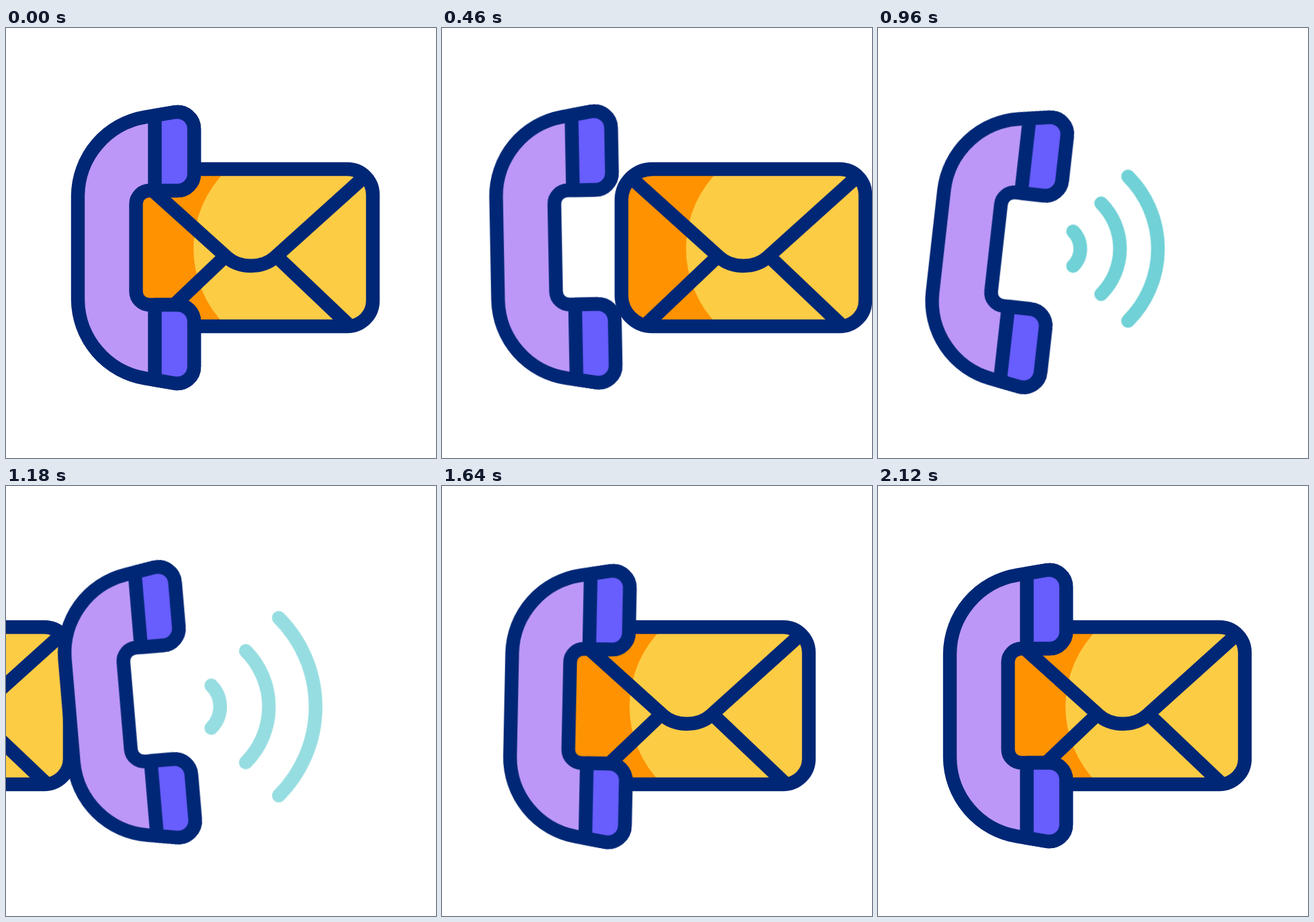
An HTML page without scripts for the animation above (2320 ms loop, 640 by 640 pixels).

```html
<!DOCTYPE html>
<html lang="en">
<head>
<meta charset="utf-8">
<title>Phone and mail</title>
<style>
  html, body { margin: 0; width: 100%; height: 100%; overflow: hidden; background: #fff; }
  svg { display: block; width: 100%; height: 100%; }

  .line { stroke: #002776; stroke-width: 20.4; stroke-linecap: round; stroke-linejoin: round; fill: none; }
  .shell { fill: #bc97f7; }
  .pad { fill: #685dfd; }

  .mail, .phone, .waves, .waves circle {
    animation: 2320ms linear infinite;
  }
  .mail { animation-name: pass; }
  .phone {
    transform-origin: 193.5px 327px;
    animation-name: recoil, ring;
  }
  .waves {
    fill: none; stroke: #70d1d6; stroke-width: 20.4; stroke-linecap: round;
    animation-name: drift, fade;
  }
  .waves circle {
    stroke-dasharray: 2 7;
    transform: rotate(-45deg);
    animation-name: grow;
  }
  .mail, .phone { animation-timing-function: cubic-bezier(.333, 0, .667, 1); }

  /* leaves on the right, returns from the left */
  @keyframes pass {
    0%, 12.931% { transform: translateX(0); }
    38.793% { transform: translateX(474px); animation-timing-function: step-end; }
    43.103% { transform: translateX(-577px); }
    68.966%, 100% { transform: translateX(0); }
  }
  @keyframes recoil {
    0%, 90.517%, 100% { translate: 0 0; }
    12.931% { translate: -25.6px 0; }
  }
  /* damped swing, one turn every 300 ms */
  @keyframes ring {
    0% { rotate: 0deg; }
    12.931% { rotate: 10deg; }
    25.862% { rotate: -10deg; }
    38.793% { rotate: 7.8deg; }
    51.724% { rotate: -5deg; }
    64.655% { rotate: 3.6deg; }
    77.586% { rotate: -1.7deg; }
    90.517%, 100% { rotate: 0deg; }
  }
  @keyframes drift {
    0%, 25.862% { transform: translate(249.3px, 328.5px); }
    60.345%, 100% { transform: translate(283px, 328.5px); }
  }
  @keyframes fade {
    0%, 25.862% { opacity: 0; }
    38.793%, 47.414% { opacity: 1; }
    60.345%, 100% { opacity: 0; }
  }
  @keyframes grow {
    0%, 25.862% { r: calc(var(--r) * .625); }
    60.345%, 100% { r: calc(var(--r) * 1.458); }
  }
</style>
</head>
<body>
<svg viewBox="0 0 640 640">
  <defs>
    <path id="body" d="M229 210H508a38 38 0 0 1 38 38V406a38 38 0 0 1-38 38H229a46 46 0 0 1-46-46V256a46 46 0 0 1 46-46z"/>
    <path id="pad" d="M221.5 130.2L251 125.3A25 25 0 0 1 280 150V217a25 25 0 0 1-25 25H221.5z"/>
  </defs>

  <g class="mail">
    <use href="#body" fill="#fdcc45"/>
    <path fill="#ff9200" d="M229 210H330A162 162 0 0 0 328 444H229a46 46 0 0 1-46-46V256a46 46 0 0 1 46-46z"/>
    <g class="line">
      <use href="#body"/>
      <path d="M197 222.7L329 341.5Q343 354 364.5 354T400 341.5L532 222.7"/>
      <path d="M323 343L221 440M406 343L508 440"/>
    </g>
  </g>

  <g class="waves">
    <circle pathLength="8" style="--r:36.5px"/>
    <circle pathLength="8" style="--r:95.5px"/>
    <circle pathLength="8" style="--r:152px"/>
  </g>

  <g class="phone">
    <path class="line shell" d="M107 250A120 120 0 0 1 207.5 132.5L251 125.3A25 25 0 0 1 280 150V217a25 25 0 0 1-25 25H213.5a20 20 0 0 0-20 20V392a20 20 0 0 0 20 20H255a25 25 0 0 1 25 25V504A25 25 0 0 1 251 528.7L207.5 521.5A120 120 0 0 1 107 404z"/>
    <use href="#pad" class="line pad"/>
    <use href="#pad" class="line pad" transform="matrix(1 0 0 -1 0 654)"/>
  </g>
</svg>
</body>
</html>
```
